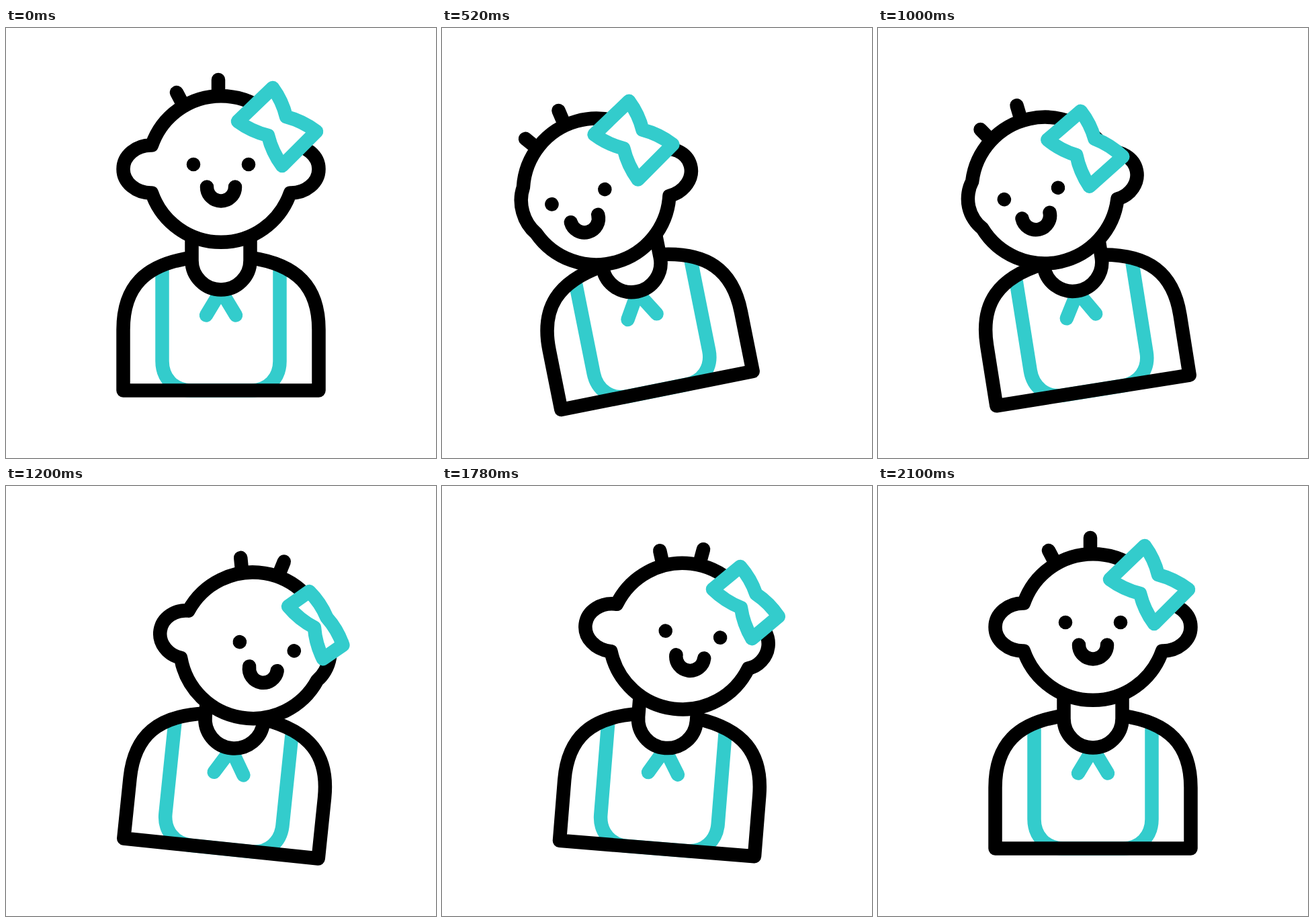
An HTML page for the animation above (2.4 s loop, 640 px wide and 640 px high).

```html
<!DOCTYPE html>
<html lang="en">
<head>
<meta charset="utf-8">
<title>Baby</title>
<style>
  html, body { margin: 0; width: 100%; height: 100%; overflow: hidden; background: #fff; }
  svg { display: block; width: 100vw; height: 100vh; }
  .line { fill: none; stroke: #000; stroke-width: 20.5; stroke-linecap: round; stroke-linejoin: round; }
  .teal { stroke: #33cccc; }
  .solid { fill: #fff; }
</style>
</head>
<body>
<svg viewBox="0 0 640 640">
  <g id="body">
    <path class="line teal" d="M232.5 362V496C232.5 521 250 539.5 275 539.5H365C390 539.5 407.5 521 407.5 496V362"/>
    <path class="line teal" d="M298 427.5L320 391L342 427.5"/>
    <path class="line" d="M276 342C207 352 174.5 385 174.5 449V539.5H465.5V449C465.5 385 433 352 364 342"/>
    <path class="line solid" style="stroke-linecap:butt" d="M276.5 300V346A43.5 43.5 0 0 0 363.5 346V300"/>
    <g id="head">
      <g id="hair">
        <path class="line" d="M-66 -114L-56.5 -96M-4 -133V-109"/>
      </g>
      <path id="skull" class="line solid"/>
      <g id="face">
        <circle cx="-41" cy="-7" r="10.3"/>
        <circle cx="41" cy="-7" r="10.3"/>
        <path class="line" d="M-21 26.5A21 21 0 0 0 21 26.5"/>
      </g>
      <path id="bow" class="line teal solid"/>
    </g>
  </g>
</svg>
<script>
const LOOP = 2400;
const EAR = 42.5;
const [body, head, hair, skull, face, bow] =
  ['body', 'head', 'hair', 'skull', 'face', 'bow'].map(id => document.getElementById(id));

// Bow corners run: top, right knot, right, bottom, left knot, left.
const rest = {
  lean: [0], tilt: [0], shift: [0, 0], gaze: [0, 0], hair: [0], ears: [EAR, EAR],
  bow: [77, -121, 97, -78, 142, -56, 91, -5, 70, -50, 25, -71]
};
const left = {
  lean: [-12.6], tilt: [-4.9], shift: [-34, 24], gaze: [-31, 8], hair: [-8.4], ears: [7, EAR],
  bow: [84, -116, 90.5, -69, 127, -34.5, 61.5, 0, 55, -51, 19.5, -84]
};
const right = {
  lean: [9.55], tilt: [5], shift: [26, 24], gaze: [31, 4.5], hair: [17], ears: [EAR, 7],
  bow: [68, -105, 105, -73.5, 134, -36.5, 116, -13.5, 93, -56, 48, -79]
};
const legs = [
  { start: 0, end: 748, from: rest, to: left, dip: 0 },
  { start: 748, end: 1455, from: left, to: right, dip: 1 },
  { start: 1455, end: 2100, from: right, to: rest, dip: 0 }
];

// Cubic Bezier (.7, 0, .3, 1), solved by bisection.
function ease(x) {
  let lo = 0, hi = 1;
  for (let i = 0; i < 30; i++) {
    const s = (lo + hi) / 2, r = 1 - s;
    if (2.1 * r * r * s + .9 * r * s * s + s * s * s < x) lo = s; else hi = s;
  }
  return lo * lo * (3 - 2 * lo);
}

function poseAt(time) {
  const leg = legs.find(l => time < l.end);
  if (!leg) return rest;
  const p = ease((time - leg.start) / (leg.end - leg.start));
  const pose = {};
  for (const key in rest) {
    pose[key] = leg.from[key].map((v, i) => v + (leg.to[key][i] - v) * p);
  }
  // The bow sags while the head swings across.
  const arc = 4 * p * (1 - p) * leg.dip;
  pose.bow = pose.bow.map((v, i) => v + arc * (i % 2 ? 18 + 9 * p : -9 * (1 - p)));
  return pose;
}

// An ear flattens into the round of the skull as its width shrinks.
function earPath(width, side) {
  const x = k => side * (103 + width * k);
  const flat = EAR - width;
  const near = side * (36 - .28 * flat), far = side * (20 - .2 * flat);
  return `C${x(.55)} ${-near} ${x(1)} ${-far} ${x(1)} 0S${x(.55)} ${near} ${x(0)} ${side * 35.5}`;
}

function skullPath([earL, earR]) {
  return `M-103 -35.5A109 109 0 0 1 103 -35.5${earPath(earR, 1)}
    A109 109 0 0 1 -103 35.5${earPath(earL, -1)}Z`;
}

function bowPath(c) {
  const bend = (i, j) => {
    const x = c[2 * i], y = c[2 * i + 1], u = c[2 * j], v = c[2 * j + 1];
    return `Q${(x + u) / 2 + (v - y) * .1} ${(y + v) / 2 - (u - x) * .1} ${u} ${v}`;
  };
  return `M${c[0]} ${c[1]}${bend(0, 1)}${bend(1, 2)}L${c[6]} ${c[7]}${bend(3, 4)}${bend(4, 5)}Z`;
}

function draw(time) {
  const pose = poseAt(time);
  const set = (el, name, value) => el.setAttribute(name, value);
  set(body, 'transform', `rotate(${pose.lean} 320 539.5)`);
  set(head, 'transform', `translate(${320 + pose.shift[0]} ${210 + pose.shift[1]}) rotate(${pose.tilt})`);
  set(hair, 'transform', `rotate(${pose.hair})`);
  set(face, 'transform', `translate(${pose.gaze})`);
  set(skull, 'd', skullPath(pose.ears));
  set(bow, 'd', bowPath(pose.bow));
}

const origin = performance.now();
function tick() {
  draw((performance.now() - origin) % LOOP);
  requestAnimationFrame(tick);
}
tick();
</script>
</body>
</html>
```
